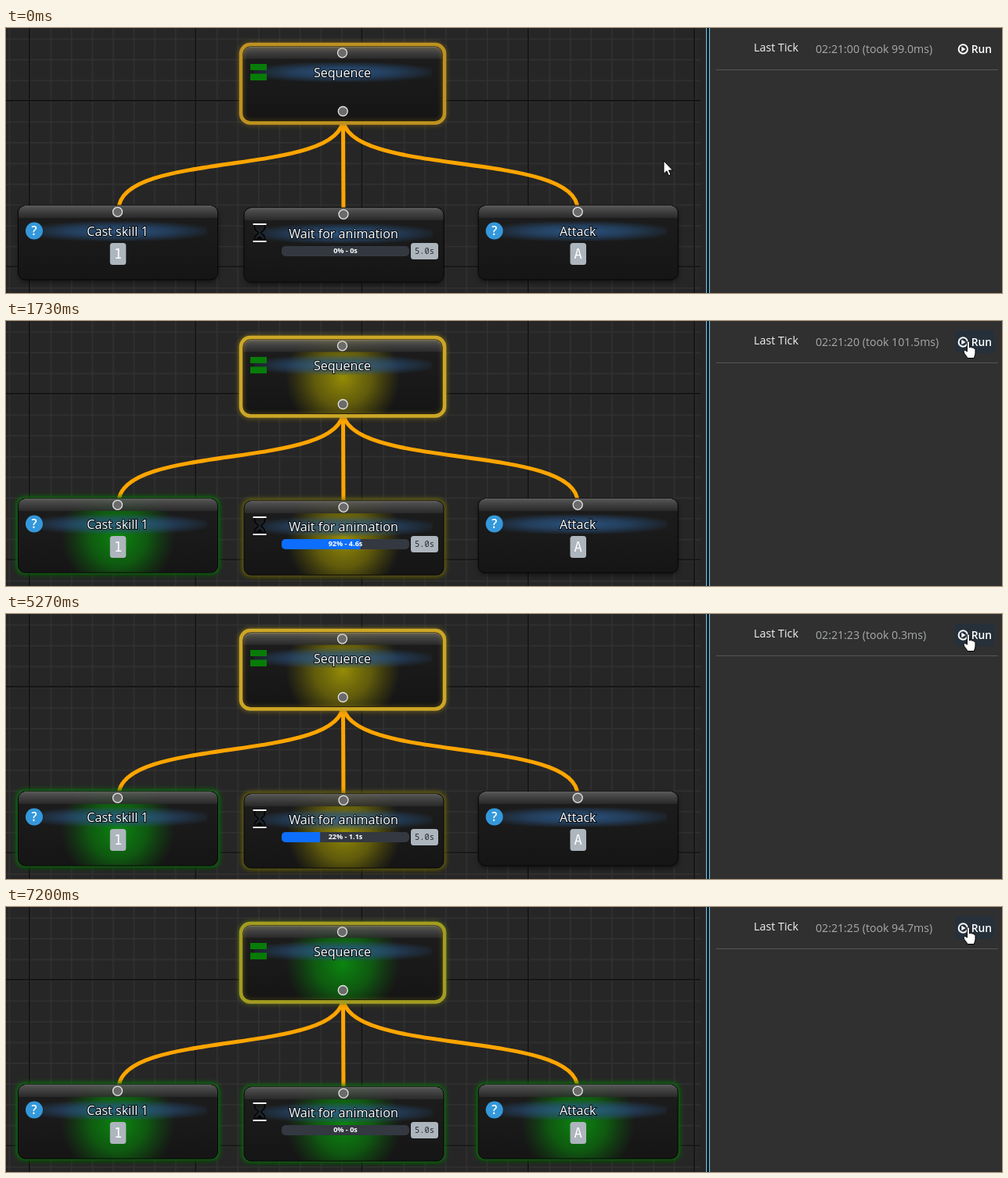
Animation of 1272x339 px, one loop 8000 ms. Source, as an HTML page:

```html
<!DOCTYPE html>
<html lang="en">
<head>
<meta charset="utf-8">
<title>Behaviour tree run</title>
<style>
html, body { margin: 0; width: 100%; height: 100%; overflow: hidden; background: #262626; }
svg { display: block; width: 1272px; height: 339px; font-family: "Open Sans", "Noto Sans", sans-serif; }
.title { font-size: 16.1px; fill: #fff; text-anchor: middle; paint-order: stroke; stroke: #000; stroke-opacity: .8; stroke-width: 2px; }
.key { font: 17px "DejaVu Sans Mono", monospace; fill: #fff; text-anchor: middle; }
.port { fill: #6b6b6b; stroke: #e4e4e4; stroke-width: 1.3; }
.wire { fill: none; stroke: #ffa500; stroke-width: 5; }
</style>
</head>
<body>
<svg viewBox="0 0 1272 339">
  <defs>
    <pattern id="minor" x="3.5" y="13.4" width="26.54" height="26.54" patternUnits="userSpaceOnUse">
      <path d="M0 .7H26.54M.7 0V26.54" stroke="#323232" stroke-width="1.4"/>
    </pattern>
    <linearGradient id="head" x2="0" y2="1">
      <stop stop-color="#626262"/><stop offset=".5" stop-color="#454545"/><stop offset="1" stop-color="#2b2b2b"/>
    </linearGradient>
    <linearGradient id="body" x2="0" y2="1">
      <stop stop-color="#1d1d1d"/><stop offset=".45" stop-color="#1a1a1a"/><stop offset="1" stop-color="#151515"/>
    </linearGradient>
    <radialGradient id="blue" r=".56">
      <stop stop-color="#2d5f94" stop-opacity=".85"/><stop offset=".5" stop-color="#28507c" stop-opacity=".66"/>
      <stop offset="1" stop-color="#28507c" stop-opacity="0"/>
    </radialGradient>
    <radialGradient id="yellow">
      <stop stop-color="#958c06"/><stop offset=".5" stop-color="#7c7408" stop-opacity=".72"/>
      <stop offset="1" stop-color="#6a6400" stop-opacity="0"/>
    </radialGradient>
    <radialGradient id="green">
      <stop stop-color="#0b860f"/><stop offset=".5" stop-color="#0c730e" stop-opacity=".72"/>
      <stop offset="1" stop-color="#0a600a" stop-opacity="0"/>
    </radialGradient>
    <filter id="blur" x="-20%" y="-30%" width="140%" height="160%"><feGaussianBlur stdDeviation="3.2"/></filter>
    <clipPath id="card"><rect width="255" height="95" rx="9"/></clipPath>
    <clipPath id="track"><rect x="352" y="279" width="163" height="13" rx="5"/></clipPath>
  </defs>

  <rect width="888" height="339" fill="#262626"/>
  <rect width="888" height="339" fill="url(#minor)"/>
  <path d="M30 0V339M242.3 0V339M454.6 0V339M666.9 0V339M879.2 0V339M0 93H888M0 305.3H888" stroke="#151515" stroke-width="1.8"/>

  <path class="wire" d="M430.5 115C430.5 191 144 156 144 232"/>
  <path class="wire" d="M430.5 115L431 234"/>
  <path class="wire" d="M430.5 115C430.5 191 730 156 730 232"/>

  <g id="nodes"></g>

  <rect id="frameGlow" x="300" y="21" width="260" height="101" rx="12" fill="none" stroke="#c89c1c" stroke-width="5" opacity=".45" filter="url(#blur)"/>
  <rect id="frame" x="300" y="21" width="260" height="100.5" rx="12" fill="none" stroke-width="4.6"/>
  <circle class="port" cx="430.3" cy="106.5" r="6"/>
  <path d="M312 46h21v8h-21zM312 58.5h21v8.5h-21z" fill="#087c08"/>

  <g id="icons"></g>

  <g fill="none" stroke="#050505" stroke-width="1.6">
    <path d="M317.5 252v3c0 5 5 5.5 5 7s-5 2-5 7v3M330.5 252v3c0 5-5 5.5-5 7s5 2 5 7v3"/>
    <path d="M319.5 271l4.500-4 4.500 4z" fill="#050505"/>
    <path d="M315.5 251h17M315.5 273h17" stroke="#f4f4f4" stroke-width="2"/>
  </g>

  <rect x="352" y="279" width="163" height="13" rx="5" fill="#343841"/>
  <rect id="bar" x="352" y="279" height="13" fill="#0d6efd" clip-path="url(#track)"/>
  <text id="left" x="433.5" y="288.4" font-size="9.1" font-weight="700" fill="#fff" text-anchor="middle"></text>
  <rect x="517" y="275" width="35" height="21" rx="3.5" fill="#adb5bd"/>
  <text x="534.5" y="288.5" text-anchor="middle" fill="#252a2f" style="font:10.4px 'Noto Sans Mono',monospace">5.0s</text>

  <rect x="887" width="385" height="339" fill="#303030"/>
  <rect x="887" width="7" height="339" fill="#262626"/>
  <rect x="894" width="5" height="339" fill="#161a1d"/>
  <path d="M894.5 0V339M898.5 0V339" stroke="#6ccbf5"/>
  <path d="M907 53.5H1267" stroke="#555"/>
  <text x="955" y="30" font-size="14.35" fill="#f2f2f2">Last Tick</text>
  <text id="stamp" x="1034" y="32" font-size="14.15" fill="#a8aaab"></text>

  <g id="run">
    <rect id="press" x="1212" y="12" width="50" height="29" rx="4" fill="#25303a"/>
    <circle cx="1222.3" cy="27" r="5.7" fill="none" stroke="#fff" stroke-width="1.9"/>
    <path d="M1220.3 23.8V30.2L1225.6 27z" fill="#fff"/>
    <text x="1232.7" y="32" font-size="13.8" font-weight="600" fill="#fff">Run</text>
  </g>

  <path id="arrow" d="M0 0V16.5L3.8 13 6.4 18.8 9 17.6 6.5 12H11.5z" fill="#fff" stroke="#000"/>
  <path id="hand" d="M-1.6 1.4C-1.6 -.6 1.6 -.6 1.6 1.4V8C2.6 6.9 4.4 7.1 4.8 8.4C5.8 7.6 7 8 7.3 9.3C8.3 8.8 9 9.5 9 10.8V15C9 18 7.5 19 7.5 21.5H-1.2C-1.8 18.5 -5.4 16.5 -6 13C-5.9 11.3 -3.4 11 -1.6 13.2z" fill="#fff" stroke="#000"/>
</svg>

<script>
const LOOP = 8000, FPS = 15;
const START = 1305, END = 6305, TICK = 1000, FADE = 400;
const WAIT = 5, STEP = 100, TRANSITION = 600;
const TOOK = ["101.5", "0.0", "0.4", "0.3", "0.6", "94.7"];
const $ = id => document.getElementById(id);
const clamp = v => Math.max(0, Math.min(1, v));

// CSS "ease": cubic-bezier(.25, .1, .25, 1)
function ease(x) {
  if (x <= 0) return 0;
  if (x >= 1) return 1;
  let lo = 0, hi = 1, s = .5;
  for (let i = 0; i < 24; i++) {
    s = (lo + hi) / 2;
    const bx = .75 * s * (1 - s) + s ** 3;
    if (bx < x) lo = s; else hi = s;
  }
  return .3 * s * (1 - s) ** 2 + 3 * s * s * (1 - s) + s ** 3;
}

const nodes = [
  { id: "seq", x: 302.5, y: 23.5, title: "Sequence", run: START, done: END + 95 },
  { id: "cast", x: 15.5, y: 227, title: "Cast skill 1", key: "1", done: START },
  { id: "wait", x: 304, y: 230, title: "Wait for animation", run: START, done: END },
  { id: "attack", x: 603.2, y: 227, title: "Attack", key: "A", done: END + 95 }
];

const outer = (id, color) =>
  `<rect id="${id}" x="-2" y="-2" width="259" height="99" rx="10" fill="${color}" filter="url(#blur)"/>`;
const inner = (id, paint) =>
  `<circle id="${id}" cx="127.5" cy="49" r="73" fill="url(#${paint})"/>`;

$("nodes").innerHTML = nodes.map(n => `
  <g transform="translate(${n.x} ${n.y})">
    <rect x="1" y="3" width="254" height="95" rx="9" opacity=".5" filter="url(#blur)"/>
    ${outer(n.id + "YO", "#756e08")}${outer(n.id + "GO", "#0a7a10")}
    <g clip-path="url(#card)">
      <rect width="255" height="95" fill="url(#body)"/>
      ${inner(n.id + "YI", "yellow")}${inner(n.id + "GI", "green")}
      <rect width="255" height="16" fill="url(#head)" opacity=".85"/>
      <rect x="14" y="20.5" width="227" height="25" fill="url(#blue)"/>
    </g>
    <rect width="255" height="95" rx="9" fill="none" stroke="#060606"/>
    <path d="M8 .8H247" stroke="#8a8a8a" stroke-width=".8" opacity=".7"/>
    <circle class="port" cx="127" cy="8.3" r="6"/>
    <text class="title" x="127" y="39">${n.title}</text>
  </g>`).join("");

$("icons").innerHTML = nodes.filter(n => n.key).map(n => `
  <g transform="translate(${n.x} ${n.y})">
    <circle cx="20.5" cy="32.5" r="11" fill="#3498db"/>
    <text x="20.5" y="38" font-size="15.5" font-weight="600" fill="#fff" text-anchor="middle">?</text>
    <rect x="117.3" y="48" width="20.5" height="28" rx="3.5" fill="#adb5bd"/>
    <text class="key" x="127.5" y="68.2">${n.key}</text>
  </g>`).join("");

// Each tick restarts the width transition from wherever the bar is.
function barWidth(t) {
  if (t < START) return 0;
  const last = Math.min(WAIT * 10, Math.floor((t - START) / STEP));
  let w = 0;
  for (let n = 0; n <= last; n++) {
    const target = 1 - n / (WAIT * 10);
    const age = n < last ? STEP : t - START - n * STEP;
    w += (target - w) * ease(age / TRANSITION);
  }
  return w;
}

function remaining(t) {
  const n = Math.floor((t - START) / STEP);
  if (n < 0 || n >= WAIT * 10) return "0% - 0s";
  const s = WAIT - n / 10;
  const time = s > .95 ? s.toFixed(1) + "s" : Math.round(s * 1000 - 2) + "ms";
  return `${100 - 2 * n}% - ${time}`;
}

function stamp(t) {
  let k = -1;
  TOOK.forEach((ms, i) => { if (t >= START + i * TICK + Math.min(95, +ms)) k = i; });
  return k < 0 ? "02:21:00 (took 99.0ms)" : `02:21:${20 + k} (took ${TOOK[k]}ms)`;
}

function busy(t) {
  if (t < 1260 || t > END + 95) return false;
  const age = (t - START + TICK) % TICK;
  return t < START + 95 || age < (t > END ? 95 : 60);
}

function draw(ms) {
  const t = Math.floor((ms + 4) * FPS / 1000) * 1000 / FPS;

  for (const n of nodes) {
    const g = ease((t - n.done) / FADE);
    const y = n.run ? ease((t - n.run) / FADE) * (1 - g) : 0;
    for (const part of ["O", "I"]) {
      $(n.id + "Y" + part).setAttribute("opacity", y);
      $(n.id + "G" + part).setAttribute("opacity", g);
    }
    if (n.id === "seq") {
      const c = [190 + 14 * y - 26 * g, 146 + 20 * y + 10 * g, 32 + 6 * y];
      for (const id of ["frame", "frameGlow"]) $(id).setAttribute("stroke", `rgb(${c.map(Math.round)})`);
    }
  }

  $("bar").setAttribute("width", 163 * barWidth(t));
  $("left").textContent = remaining(t);
  $("stamp").textContent = stamp(t);
  $("press").setAttribute("opacity", t >= 1195 ? 1 : 0);
  $("run").setAttribute("opacity", busy(t) ? .65 : 1);

  const p = clamp(t / 733), q = p * p * (3 - 2 * p);
  const x = 840 + 389 * q, y = 170 - 144 * q, over = x > 1212;
  for (const id of ["arrow", "hand"]) $(id).setAttribute("transform", `translate(${x} ${y})`);
  $("arrow").setAttribute("visibility", over ? "hidden" : "visible");
  $("hand").setAttribute("visibility", over ? "visible" : "hidden");
}

const t0 = performance.now();
function loop() {
  draw((performance.now() - t0) % LOOP);
  requestAnimationFrame(loop);
}
loop();
</script>
</body>
</html>
```
